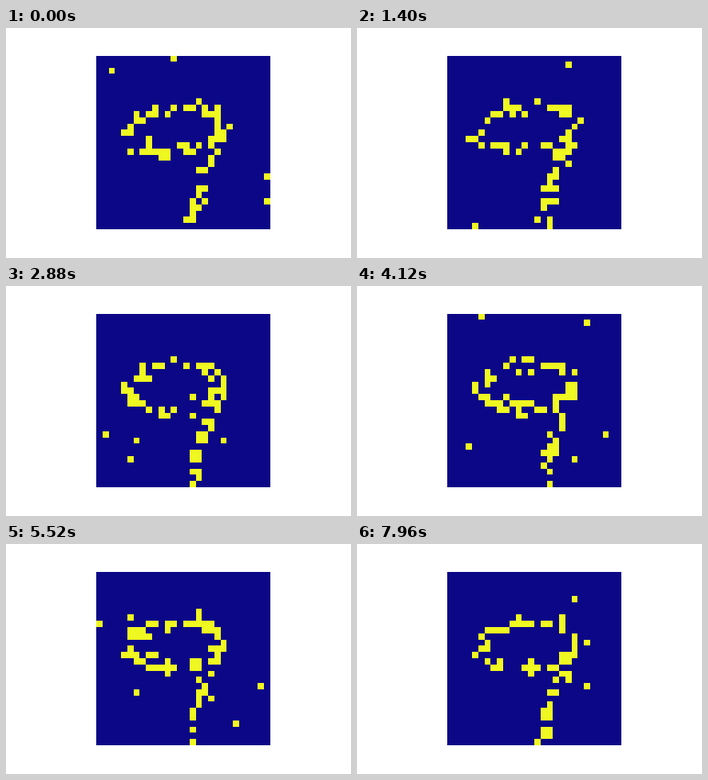
Recreate the animation shown at these times as a matplotlib script. Size 432 px wide and 288 px high, loop 8 s.

```python
import numpy as np
import matplotlib.pyplot as plt
from matplotlib.animation import FuncAnimation

SIZE, FRAMES, INTERVAL = 28, 200, 40
NOISE = 0.0075


def stroke(cols, rows, peak, width=1.0):
    """Firing rate of each cell, fading with distance from a curve."""
    y, x = np.mgrid[:SIZE, :SIZE]
    dist = np.hypot(x[..., None] - cols, y[..., None] - rows).min(axis=-1)
    return peak * np.exp(-(dist / width) ** 2)


def spike_rates():
    # Bowl of the nine: a slightly sheared ellipse.
    t = np.linspace(0, 2 * np.pi, 300)
    bowl = stroke(12.3 + 7.3 * np.cos(t),
                  11.4 + 3.7 * np.sin(t) - 0.6 * np.cos(t), 0.6)
    # Tail: curves down from the right side of the bowl.
    s = np.linspace(0, 1, 150)
    tail = stroke(15.3 + 4.2 * (1 - s) ** 1.6, 12 + 14.3 * s, 0.58)
    return 1 - (1 - bowl) * (1 - tail) * (1 - NOISE)


rng = np.random.default_rng(9)
spikes = rng.random((FRAMES, SIZE, SIZE)) < spike_rates()

fig, ax = plt.subplots(figsize=(6, 4), dpi=72, facecolor="white")
fig.subplots_adjust(left=0.125, right=0.9, bottom=0.125, top=0.88)
ax.axis("off")
image = ax.imshow(spikes[0].astype(float), cmap="plasma", vmin=0, vmax=1,
                  interpolation="nearest")


def update(frame):
    image.set_data(spikes[frame].astype(float))
    return [image]


anim = FuncAnimation(fig, update, frames=FRAMES, interval=INTERVAL,
                     repeat=True, repeat_delay=0, blit=False)
plt.show()
```
